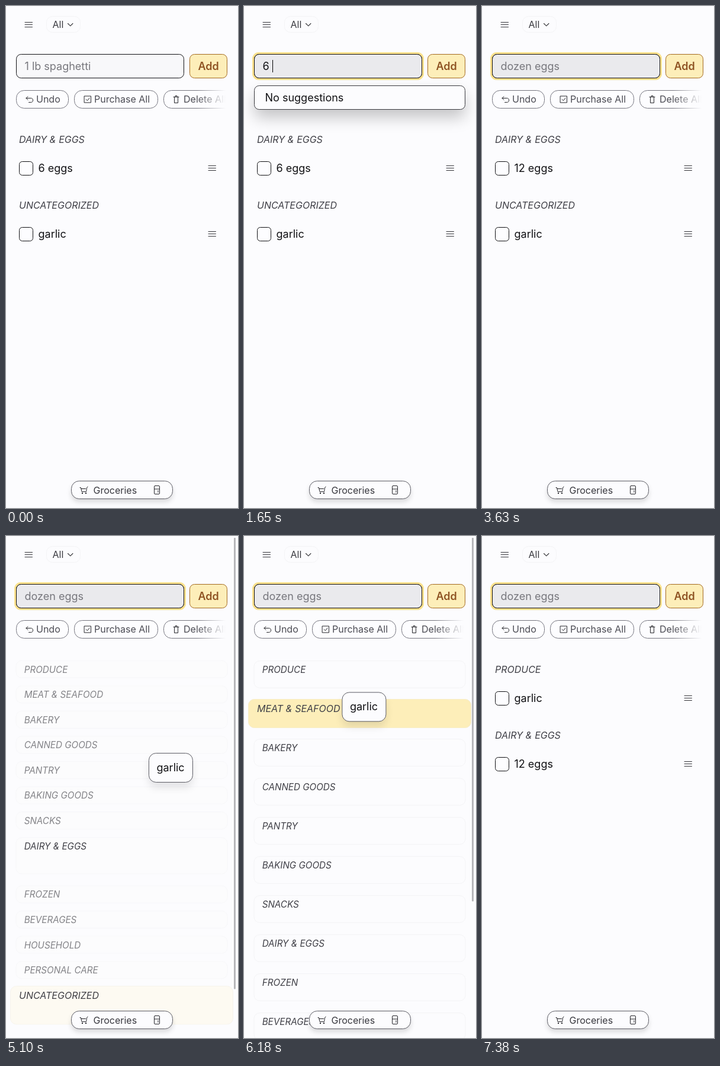
These frames come from a looping animation (392x847 px, 8.64 s). An HTML page with a canvas:

```html
<!DOCTYPE html>
<html lang="en">
<head>
<meta charset="utf-8">
<title>Grocery list</title>
<style>
  html, body { margin: 0; width: 100%; height: 100%; overflow: hidden; background: #fcfcfe; }
  canvas { display: block; width: 392px; height: 847px; }
</style>
</head>
<body>
<canvas id="stage"></canvas>
<script>
const W = 392, H = 847, LOOP = 8640;
const BG = '#fcfcfe', INK = '#111114', SOFT = '#4b4b53', YELLOW = '#fdeeb9';
const SANS = 'Inter, "Liberation Sans", sans-serif';
const CATEGORIES = ['PRODUCE', 'MEAT & SEAFOOD', 'BAKERY', 'CANNED GOODS', 'PANTRY',
  'BAKING GOODS', 'SNACKS', 'DAIRY & EGGS', 'FROZEN', 'BEVERAGES', 'HOUSEHOLD',
  'PERSONAL CARE', 'UNCATEGORIZED'];
const PRODUCE = 0, MEAT = 1, BAKERY = 2, DAIRY = 7, UNCATEGORIZED = 12;
const LIST_TOP = 209, LIST_MIDDLE = 195.5, PICK_UP = 5013.5, DROP = 6900;
const TYPING = [[1320, '6'], [1650, '6 '], [1800, '6 e'], [1950, '6 eg'], [2070, '6 egg'], [2190, '6 eggs']];

const canvas = document.getElementById('stage');
const ctx = canvas.getContext('2d');
const dpr = window.devicePixelRatio || 1;
canvas.width = W * dpr;
canvas.height = H * dpr;

const clamp = v => Math.max(0, Math.min(1, v));
const ramp = (t, start, length) => clamp((t - start) / length);
const easeOut = p => 1 - (1 - p) ** 3;
const within = (t, a, b) => t >= a && t < b;

function track(t, keys) {
  if (t <= keys[0][0]) return keys[0][1];
  for (let i = 1; i < keys.length; i++) {
    const [t0, a] = keys[i - 1], [t1, b] = keys[i];
    if (t < t1) return a + (b - a) * (t - t0) / (t1 - t0);
  }
  return keys[keys.length - 1][1];
}

function faded(alpha, draw) {
  if (alpha <= 0) return;
  ctx.save();
  ctx.globalAlpha *= alpha;
  draw();
  ctx.restore();
}

function scaled(scale, x, y, draw) {
  ctx.save();
  ctx.translate(x, y);
  ctx.scale(scale, scale);
  ctx.translate(-x, -y);
  draw();
  ctx.restore();
}

function box(x, y, w, h, r, fill, stroke, shadow) {
  if (h < 2) return;
  ctx.save();
  ctx.beginPath();
  const inset = stroke ? 0.5 : 0;
  ctx.roundRect(x + inset, y + inset, w - 2 * inset, h - 2 * inset, Math.min(r, h / 2));
  if (shadow) {
    ctx.shadowColor = `rgba(0,0,0,${shadow.alpha})`;
    ctx.shadowBlur = shadow.blur * dpr;
    ctx.shadowOffsetY = shadow.y * dpr;
  }
  if (fill) { ctx.fillStyle = fill; ctx.fill(); }
  ctx.shadowColor = 'transparent';
  if (stroke) { ctx.strokeStyle = stroke; ctx.lineWidth = 1; ctx.stroke(); }
  ctx.restore();
}

function text(str, x, y, size, color, style = '400') {
  ctx.font = `${style} ${size}px ${SANS}`;
  ctx.fillStyle = color;
  ctx.fillText(str, x, y);
}

function icon(d, x, y, color = '#26262b', width = 1) {
  ctx.save();
  ctx.translate(x, y);
  ctx.strokeStyle = color;
  ctx.lineWidth = width;
  ctx.lineCap = ctx.lineJoin = 'round';
  ctx.stroke(new Path2D(d));
  ctx.restore();
}

const bars = (x, y) => icon('M0 -4H12.5M0 0H12.5M0 4H12.5', x, y, '#37373c');

function header() {
  bars(32, 31.5);
  box(68, 17, 58, 28, 10, BG, '#f4f4f6');
  text('All', 78.5, 37, 16, '#3a3a40');
  icon('M0 0L4.2 4.2L8.4 0', 104.5, 29.5, '#333338', 1.1);
}

function pills() {
  const pill = (x, w, label, labelX) => {
    box(x, 142, w, 31, 13, '#fdfdff', '#74747e');
    text(label, labelX, 163, 16, SOFT);
  };
  ctx.save();
  ctx.beginPath();
  ctx.rect(0, 140, 371, 36);
  ctx.clip();
  pill(17, 89, 'Undo', 51);
  icon('M3.5 0L0.5 3L3.5 6M0.5 3H9C13 3 13 10 9 10H5', 33.5, 152.5);
  pill(115, 142, 'Purchase All', 149);
  icon('M0 0H11V11H0ZM2.8 5.5L4.9 7.8L8.5 3.2', 132.5, 152);
  pill(266, 126, 'Delete All', 300);
  icon('M0 2H9M3 2V0H6V2M1.5 2V12H7.5V2', 283, 151.5);
  const fade = ctx.createLinearGradient(322, 0, 371, 0);
  fade.addColorStop(0, 'rgba(252,252,254,0)');
  fade.addColorStop(1, BG);
  ctx.fillStyle = fade;
  ctx.fillRect(322, 140, 50, 36);
  ctx.restore();
}

function entryField(t) {
  const focus = ramp(t, 615, 150);
  faded(focus, () => box(14, 78, 290, 47, 11, '#fbe18c'));
  box(17, 81, 284, 41, 8, '#f8f8fa', INK);
  faded(focus, () => box(17, 81, 284, 41, 8, '#eaeaed', INK));

  let typed = '';
  if (t < 2520) for (const [at, value] of TYPING) if (t >= at) typed = value;
  if (typed) text(typed, 31.5, 108, 18, INK);
  else text(t < 2520 ? '1 lb spaghetti' : 'dozen eggs', 31.5, 108, 18, '#77777d');

  const caretOn = within(t, 630, 1080) || within(t, 1320, 2670) ||
    within(t, 3150, 3630) || within(t, 4110, 4590);
  if (caretOn) {
    ctx.font = `400 18px ${SANS}`;
    ctx.fillStyle = '#000';
    ctx.fillRect(Math.round(32 + ctx.measureText(typed).width), 91, 1, 21);
  }

  box(310, 81, 64, 41, 8, YELLOW, '#a3691f');
  text('Add', 324.5, 108, 18, '#8f5424', '600');
}

function suggestions(t) {
  faded(easeOut(ramp(t, 615, 300)) * (1 - ramp(t, 2490, 180)), () => {
    box(17, 134, 357, 41, 8, BG, '#3a3a3f', { y: 14, blur: 26, alpha: 0.22 });
    text('No suggestions', 35.5, 161, 18, INK);
  });
}

function item(label, top, alpha) {
  faded(alpha, () => {
    box(22, top + 53, 24, 24, 5, '#fdfdff', INK);
    text(label, 54.5, top + 71, 18, INK);
    bars(342, top + 64.5);
  });
}

const cardX = t => track(t, [[5100, 241], [5790, 199], [5850, 186], [6100, 168], [6660, 150]]);
const cardY = t => track(t, [[5100, 366], [5650, 362], [5790, 356], [5850, 326], [6100, 276], [6350, 237], [6660, 226]]);

function hovering(i, t) {
  if (i === PRODUCE) return ramp(t, 6300, 150);
  if (i === MEAT) return ramp(t, 5930, 150) * (1 - ramp(t, 6300, 150));
  if (i === BAKERY) return ramp(t, 5200, 150) * (1 - ramp(t, 5930, 150));
  if (i === DAIRY) return t >= DROP ? 1 : 1 - ramp(t, 5010, 60);
  if (i === UNCATEGORIZED) return 1 - ramp(t, 5200, 150);
  return 0;
}

// Returns the height, following gap and label opacity of one section.
function measure(i, open, close, dropped) {
  if (dropped) {
    if (i === PRODUCE) return [49 + 46 * close, -1 + 17 * close, 1];
    if (i === DAIRY) return [49 + 46 * close, 17 - close, close];
    return [49 * (1 - close), close - 1, i === UNCATEGORIZED ? 0 : 1 - close];
  }
  if (i === DAIRY || i === UNCATEGORIZED) return [95 - 46 * open, 16 + open, 1];
  return [49 * open, 17 * open, open];
}

function list(t) {
  const dropped = t >= DROP;
  const open = easeOut(ramp(t, PICK_UP, 300));
  const close = easeOut(ramp(t, DROP, 450));
  const itemAlpha = dropped ? close : 1 - ramp(t, 5010, 60);
  const boxAlpha = dropped ? 1 - close : open;
  const tint = ramp(t, 5040, 240);
  let top = LIST_TOP, bottom = top;

  CATEGORIES.forEach((name, i) => {
    const [height, gap, alpha] = measure(i, open, close, dropped);
    const hover = hovering(i, t);
    if (i === DAIRY) {
      const flash = ramp(t, 2490, 150) * (1 - ramp(t, 3510, 120));
      faded(flash, () => box(8, top + 36, 375, 59, 8, YELLOW));
    }
    // Sections shrink slightly unless the dragged card is over them.
    scaled(0.95 + 0.05 * hover, LIST_MIDDLE, top + height / 2, () => {
      if (!dropped || alpha === 1 || alpha === 1 - close) faded(boxAlpha, () => {
        box(7, top, 377, height, 10, BG, '#f3f3f5');
        faded(tint * hover, () => box(7, top, 377, height, 10, YELLOW, '#f8edc6'));
      });
      faded(alpha, () => text(name, 22, top + 22, 16, '#3f3f46', 'italic 400'));
    });
    if (i === DAIRY) item(t < 2520 ? '6 eggs' : '12 eggs', top, itemAlpha);
    if (i === (dropped ? PRODUCE : UNCATEGORIZED)) item('garlic', top, itemAlpha);
    bottom = top + height;
    top += height + gap;
  });
  return bottom + 111;
}

function dragCard(t) {
  if (!within(t, 5010, DROP)) return;
  faded(ramp(t, 4990, 60), () => {
    const x = cardX(t), y = cardY(t);
    box(x, y, 75, 50, 12, BG, '#5c5c64', { y: 9, blur: 14, alpha: 0.1 });
    text('garlic', x + 13.5, y + 31, 18, INK);
  });
}

function tabBar() {
  box(110, 801, 172, 31, 13, BG, '#5c5c64', { y: 5, blur: 9, alpha: 0.15 });
  icon('M0 1.5H1.5L3 8.5H10.5L11.5 2L13 0M2 3.5H9.5', 125, 811);
  ctx.fillStyle = '#26262b';
  for (const x of [128, 134]) ctx.fillRect(x, 821, 2, 2);
  text('Groceries', 147.5, 823, 16, '#38383e');
  icon('M1.5 0H7.5Q9 0 9 1.5V12.5Q9 14 7.5 14H1.5Q0 14 0 12.5V1.5Q0 0 1.5 0ZM0 5.5H9M6.5 8V11', 250.5, 809.5);
}

function scrollThumb(pageHeight) {
  if (pageHeight <= H) return;
  box(385, 3, 3, 841 * H / pageHeight, 1, '#b7b7ba');
}

function render(t) {
  ctx.setTransform(dpr, 0, 0, dpr, 0, 0);
  ctx.fillStyle = BG;
  ctx.fillRect(0, 0, W, H);
  header();
  pills();
  const pageHeight = list(t);
  entryField(t);
  suggestions(t);
  dragCard(t);
  tabBar();
  scrollThumb(pageHeight);
}

const startTime = performance.now();
function tick() {
  render((performance.now() - startTime) % LOOP);
  requestAnimationFrame(tick);
}
tick();
</script>
</body>
</html>
```
